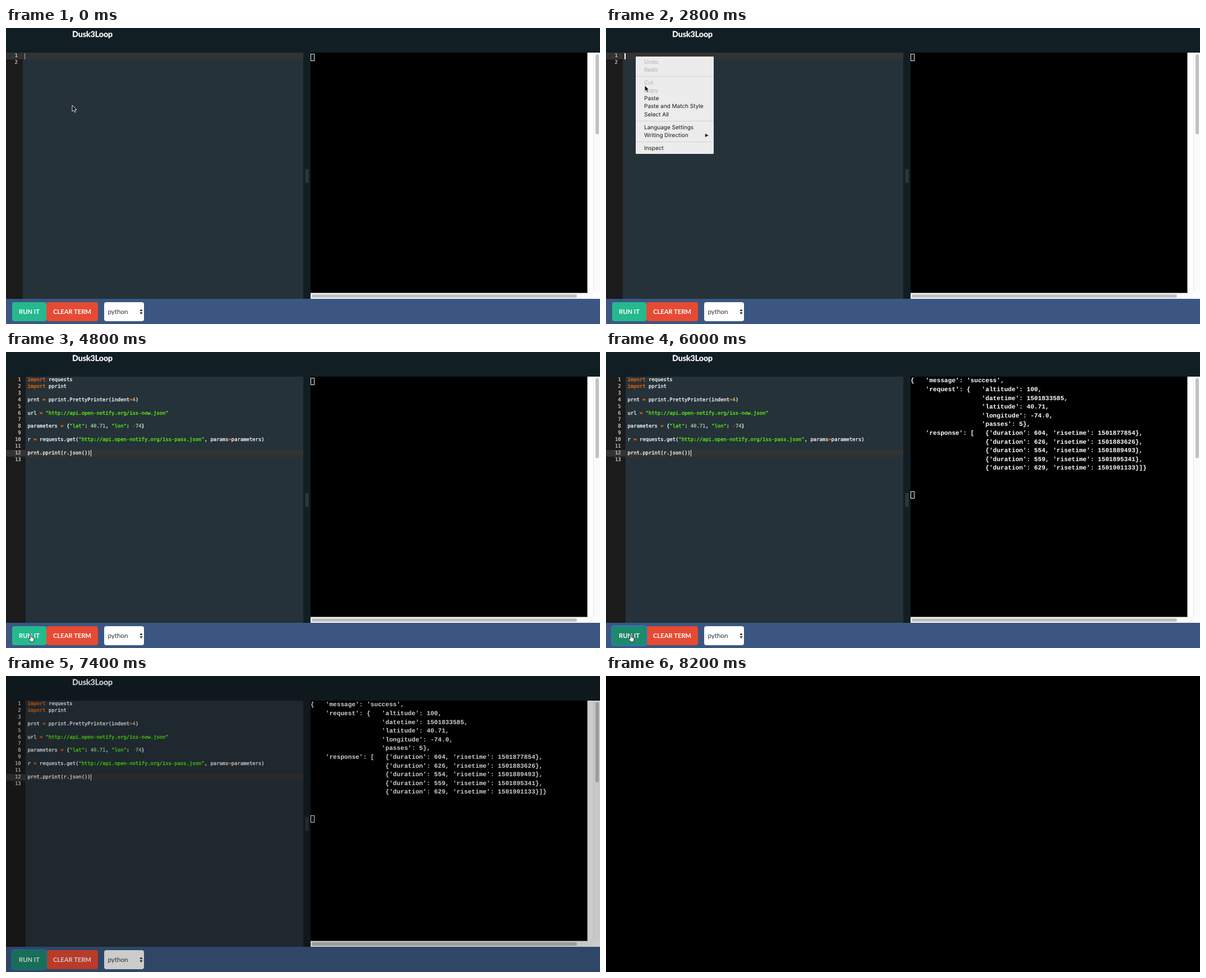
Write an HTML page that moves like this. It is 1059 by 529 pixels and loops after 8400 ms.

```html
<!DOCTYPE html>
<html lang="en">
<head>
<meta charset="utf-8">
<title>Code editor demo</title>
<style>
  html, body { margin: 0; width: 100%; height: 100%; overflow: hidden; background: #111e24; }
  body { text-rendering: geometricPrecision; -webkit-font-smoothing: antialiased; }
  .stage { position: absolute; inset: 0 auto auto 0; width: 1059px; height: 529px; overflow: hidden; background: #111e24; }
  .stage * { box-sizing: border-box; }
  .stage div, pre, svg { position: absolute; margin: 0; }
  .anim { animation: 8400ms step-end -10ms infinite; }

  .title { left: 118px; top: 3px; font: bold 14.2px/18px Lato, sans-serif; color: #fff; -webkit-text-stroke: .3px; }

  /* editor */
  .editor { left: 0; top: 44px; width: 530px; height: 441px; background: #253239; color: #fff;
    font: 8.88px/11.9px "DejaVu Sans Mono", monospace; }
  .gutter { left: 0; top: 0; height: 441px; width: 30px; background: #1b1b1b; }
  .row { left: 0; width: 530px; height: 12px; background: #333; }
  .nums { right: calc(100% - 20.8px); top: 1px; text-align: right; font: inherit; color: #e8e8e8; -webkit-text-stroke: .15px; }
  .full .gutter { width: 35px; }
  .full .nums { right: calc(100% - 26.6px); }
  .full { animation-name: pasted; }
  .code { left: 38.5px; top: 1px; font: inherit; -webkit-text-stroke: .3px; }
  .code b { font-weight: normal; color: #ff6600; }
  .code i { font-style: normal; color: #5cf80e; }
  .code u { text-decoration: none; color: #99cc99; }
  .caret { left: 33px; top: 1px; width: 2px; height: 11px; background: #fff; animation-name: blink; }
  .full .caret { left: 151px; top: 131px; width: 1px; height: 12px; animation: none; }

  .grip { left: 533px; top: 252px; width: 7px; height: 25px; border-radius: 1px;
    background: repeating-linear-gradient(90deg, #1b262b 0 1px, #3a4448 1px 2px); }

  /* terminal */
  .panel { left: 543px; top: 44px; width: 516px; height: 441px; background: #fff; }
  .track { background: #fafafa; }
  .track.v { left: 504px; top: 0; width: 12px; height: 429px; border-left: 1px solid #e8e8e8; }
  .track.h { left: 0; top: 429px; width: 504px; height: 12px; }
  .thumb { background: #c1c1c1; border-radius: 3px; }
  .thumb.v { left: 508px; top: 3px; width: 6px; height: 143px; }
  .thumb.h { left: 2px; top: 432px; width: 473px; height: 6px; }
  .term { left: 0; top: 0; width: 494px; height: 430px; background: #000; border: solid #808080; border-width: 0 1px 1px 0; }
  .out { left: 0; top: 1.4px; color: #fff; font: bold 11.13px/15.6px "Liberation Mono", monospace; animation-name: printed; }
  .block { left: 0; top: 2px; width: 7px; height: 13px; border: 1px solid #fff; animation-name: drop; }

  /* toolbar */
  .bar { left: 0; top: 484px; width: 1059px; height: 45px; background: #3b5781; }
  .btn { top: 6px; height: 33.5px; border-radius: 4px; color: #fff; text-align: center;
    font: bold 11.2px/36px Lato, sans-serif; white-space: nowrap; }
  .run { left: 11px; width: 61px; background: #25b98f; animation-name: press; }
  .clear { left: 72px; width: 92px; background: #e74a33; }
  .pick { left: 175px; width: 71px; background: #fff; color: #333; text-align: left; padding-left: 6.5px;
    font-weight: normal; font-size: 11.6px; }
  .pick svg { left: 62.5px; top: 11px; }

  /* context menu */
  .menu { left: 53px; top: 51px; width: 139px; height: 174px; padding-top: 3px; background: #ececec;
    color: #1a1a1a; font: 10px/14.1px Inter, sans-serif; border-radius: 1px; animation-name: menu; }
  .menu p { position: relative; margin: 0; padding-left: 15px; height: 14.1px; white-space: nowrap; }
  .menu hr { margin: 4px 0; border: 0; height: 1px; background: #d2d2d2; }
  .menu .off { color: #b0b0b0; }
  .menu .hot { animation-name: hot; }
  .menu span { position: absolute; right: 9px; font: 8px/14px "DejaVu Sans", sans-serif; }

  .pointer { left: 0; top: 0; width: 1px; height: 1px; animation-name: move; }
  .pointer svg { left: 0; top: 0; overflow: visible; }
  .arrow { animation-name: arrow; }
  .beam { animation-name: beam; }
  .hand { animation-name: hand; }
  .fade { inset: 0; background: #000; animation-name: fade; }

  @keyframes blink {
    0% { opacity: .6; width: 1px; }
    2.381% { opacity: 0; width: 2px; }
    7.143% { opacity: 1; width: 2px; }
    11.905% { opacity: 0; width: 2px; }
    19.048% { opacity: 1; width: 2px; }
    23.81% { opacity: 0; width: 2px; }
    28.571%, 100% { opacity: 1; width: 2px; }
  }
  @keyframes pasted { 0% { opacity: 0; } 42.857%, 100% { opacity: 1; } }
  @keyframes printed { 0% { opacity: 0; } 64.286%, 100% { opacity: 1; } }
  @keyframes drop { 0% { top: 2px; } 64.286%, 100% { top: 205px; } }
  @keyframes press {
    0% { background: #25b98f; box-shadow: none; }
    59.524%, 100% { background: #1c8a6b; box-shadow: 0 0 0 1.5px #2b7fd2; }
  }
  @keyframes menu {
    0% { opacity: 0; }
    28.571% { opacity: 1; }
    40.476% { opacity: .06; }
    42.857%, 100% { opacity: 0; }
  }
  @keyframes hot {
    0% { background: transparent; color: #1a1a1a; }
    35.714%, 100% { background: #2f7df6; color: #fff; }
  }
  @keyframes move {
    0% { transform: translate(118px, 138px); }
    4.762% { transform: translate(118px, 138px); animation-timing-function: steps(6, end); }
    19.048% { transform: translate(55px, 58px); }
    26.19% { transform: translate(53px, 51px); }
    28.571% { transform: translate(53px, 51px); animation-timing-function: steps(3, end); }
    35.714% { transform: translate(77px, 128px); }
    45.238% { transform: translate(77px, 128px); animation-timing-function: steps(5, end); }
    57.143%, 100% { transform: translate(44px, 505px); }
  }
  @keyframes arrow {
    0% { opacity: 1; }
    9.524% { opacity: 0; }
    28.571% { opacity: 1; }
    42.857%, 100% { opacity: 0; }
  }
  @keyframes beam {
    0% { opacity: 0; }
    9.524% { opacity: 1; }
    28.571% { opacity: 0; }
    42.857% { opacity: 1; }
    57.143%, 100% { opacity: 0; }
  }
  @keyframes hand {
    0% { opacity: 0; }
    57.143% { opacity: 1; }
    88.095%, 100% { opacity: 0; }
  }
  @keyframes fade {
    0% { opacity: 0; }
    85.714% { opacity: 0; animation-timing-function: steps(5, end); }
    97.619%, 100% { opacity: 1; }
  }
</style>
</head>
<body>
<div class="stage">
  <div class="title">Dusk3Loop</div>

  <div class="editor">
    <div class="gutter"></div>
    <div class="row" style="top:0"></div>
    <pre class="nums">1
2</pre>
    <div class="caret anim"></div>
  </div>

  <div class="editor full anim">
    <div class="gutter"></div>
    <div class="row" style="top:131px"></div>
    <pre class="nums">1
2
3
4
5
6
7
8
9
10
11
12
13</pre>
    <pre class="code"><b>import</b> requests
<b>import</b> pprint

prnt <b>=</b> pprint.PrettyPrinter(indent<b>=</b><u>4</u>)

url <b>=</b> <i>"http://api.open-notify.org/iss-now.json"</i>

parameters <b>=</b> {<i>"lat"</i>: <u>40.71</u>, <i>"lon"</i>: <b>-</b><u>74</u>}

r <b>=</b> requests.get(<i>"http://api.open-notify.org/iss-pass.json"</i>, params<b>=</b>parameters)

prnt.pprint(r.json())
</pre>
    <div class="caret"></div>
  </div>

  <div class="grip"></div>

  <div class="panel">
    <div class="track v"></div>
    <div class="track h"></div>
    <div class="thumb v"></div>
    <div class="thumb h"></div>
    <div class="term">
      <pre class="out anim">{   'message': 'success',
    'request': {   'altitude': 100,
                   'datetime': 1501833585,
                   'latitude': 40.71,
                   'longitude': -74.0,
                   'passes': 5},
    'response': [   {'duration': 604, 'risetime': 1501877854},
                    {'duration': 626, 'risetime': 1501883626},
                    {'duration': 554, 'risetime': 1501889493},
                    {'duration': 559, 'risetime': 1501895341},
                    {'duration': 629, 'risetime': 1501901133}]}</pre>
      <div class="block anim"></div>
    </div>
  </div>

  <div class="bar">
    <div class="btn clear">CLEAR TERM</div>
    <div class="btn run anim">RUN IT</div>
    <div class="btn pick">python
      <svg width="6" height="12"><path d="M.3 5 3 1l2.7 4zM.3 7 3 11l2.7-4z" fill="#333"/></svg>
    </div>
  </div>

  <div class="menu anim">
    <p class="off">Undo</p>
    <p class="off">Redo</p>
    <hr>
    <p class="off">Cut</p>
    <p class="off">Copy</p>
    <p class="hot anim">Paste</p>
    <p>Paste and Match Style</p>
    <p>Select All</p>
    <hr>
    <p>Language Settings</p>
    <p>Writing Direction<span>▶</span></p>
    <hr>
    <p>Inspect</p>
  </div>

  <div class="pointer anim">
    <svg class="arrow anim" width="1" height="1">
      <path d="M0 0V11L2.6 8.7 4.5 12.8 6.5 11.9 4.7 8H8z" fill="#111" stroke="#fff" stroke-width=".9"/>
    </svg>
    <svg class="beam anim" width="1" height="1">
      <path d="M-2-6Q0-6 0-4.5Q0-6 2-6M0-5V5M-2 6Q0 6 0 4.5Q0 6 2 6M-1.2 2H1.2" fill="none" stroke="#0b0f11" stroke-width="1"/>
    </svg>
    <svg class="hand anim" width="1" height="1">
      <path d="M-1 8V.8Q-1-.4 0-.4T1 .8V4.6Q2.2 4 2.8 5.2 4 4.6 4.4 5.8 6 5.6 6 7V9.5L4.8 13H-.4L-3.2 8.6Q-3.4 7.2-2.2 7.3z" fill="#fff" stroke="#111" stroke-width=".9"/>
    </svg>
  </div>

  <div class="fade anim"></div>
</div>
</body>
</html>
```
